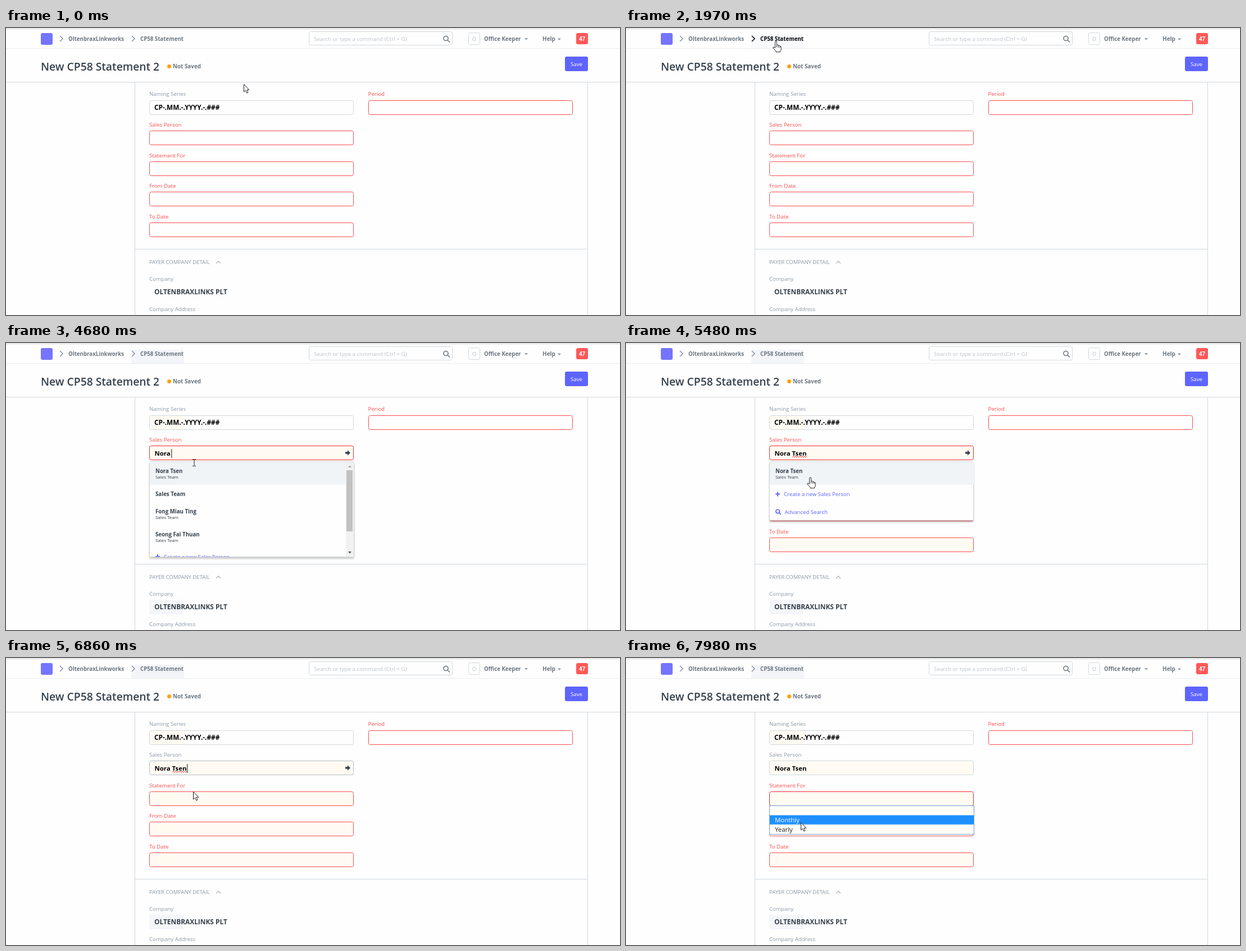
Recreate the animation shown at these times as an HTML page. Size 1093 by 512 pixels, loop 8000 ms.

```html
<!DOCTYPE html>
<html lang="en">
<head>
<meta charset="utf-8">
<title>New statement form</title>
<style>
  html, body { margin: 0; width: 100%; height: 100%; overflow: hidden; background: #fefefe; }
  svg { display: block; width: 1093px; height: 512px; font-family: "Open Sans", "Noto Sans", sans-serif; }

  text { font-size: 9.7px; fill: #8d99a6; white-space: pre; }
  .bold { font-weight: 700; fill: #6c7680; }
  .value { font-size: 11.4px; font-weight: 700; fill: #000; }
  .need { fill: #fc4c4e; }
  .dark { fill: #36414c; }
  .sub { font-size: 7.9px; fill: #36414c; }
  .action { font-size: 9.6px; fill: #5e64ff; }
  .option { font-size: 11.4px; fill: #222; }
  .line { fill: none; stroke: #d1d8dd; }
  .must { fill: none; stroke: #fc4c4e; }
  .icon { fill: none; stroke: #8d99a6; stroke-width: 1.6; }
  .panel { fill: #fefefe; stroke: #d1d8dd; filter: drop-shadow(0 3px 1.8px #0003); }
  .cream { fill: #fffbf3; width: 0; }

  /* One loop is 8 s, so 1% is 80 ms. */
  .t { animation: 8s step-end infinite; }
  .off { opacity: 0; }

  @keyframes crumb1 { 20% { opacity: 1 } 22% { opacity: 0 } }
  @keyframes crumb2 { 22.25% { opacity: 1 } 28.5% { opacity: 0 } }
  @keyframes crumbShade { 22.25% { opacity: .5 } 28.5%, to { opacity: 1 } }
  @keyframes shade { 28.5%, to { opacity: 1 } }

  @keyframes tintName { 28.5%, to { width: 62px } }
  @keyframes tintSales { 28.5% { width: 62px } 40.375%, to { width: 363px } }
  @keyframes tintRest { 28.5% { width: 62px } 46.125%, to { width: 363px } }

  @keyframes salesLabel { 72.75%, to { fill: #8d99a6 } }
  @keyframes salesBorder {
    40.375% { stroke: #f5262b }
    72.75% { stroke: #ee7673 }
    74.75% { stroke: #b5bcc2 }
    88.75%, to { stroke: #d1d8dd }
  }
  @keyframes stateBorder { 88.75%, to { stroke: #f5262b } }

  @keyframes typed {
    46.125% { width: 9.5px } 47.75% { width: 16.5px } 51% { width: 21.7px }
    52% { width: 29px } 68.5%, to { width: 62px }
  }
  @keyframes caretMove {
    46.125% { transform: translateX(9px) } 47.75% { transform: translateX(16px) }
    51% { transform: translateX(22px) } 52% { transform: translateX(29.5px) }
    68.5%, to { transform: translateX(57.5px) }
  }
  @keyframes caretShow { 40.375% { opacity: 1 } 68.5% { opacity: 0 } 75% { opacity: 1 } 88.75% { opacity: 0 } }
  @keyframes squiggle { 68.5% { opacity: 1 } 96.125% { opacity: 0 } }
  @keyframes link { 46.125% { opacity: 1 } 88.75% { opacity: 0 } }

  @keyframes fullList { 46.5% { opacity: 1 } 58.75% { opacity: 0 } }
  @keyframes shortList { 58.75% { opacity: 1 } 69.25% { opacity: 0 } 72.75% { opacity: 1 } 74.75% { opacity: 0 } }
  @keyframes popup { 89.25%, to { opacity: 1 } }
  @keyframes pick { 97.5%, to { transform: translateY(16.5px) } }
  @keyframes pickText { 97.5%, to { fill: #fff } }

  @keyframes path {
    0%, 17.5% { transform: translate(423px, 100px) }
    20.625% { transform: translate(84px, 22px) }
    23.75%, 28.25% { transform: translate(267px, 24px) }
    29% { transform: translate(305px, 484px) }
    36.125%, 58.25% { transform: translate(341px, 203px) }
    58.5% { transform: translate(335px, 213px) }
    63.25%, 68.5% { transform: translate(328px, 240px) }
    70.625%, 74.5% { transform: translate(329px, 251px) }
    80.25%, 85.5% { transform: translate(333px, 230px) }
    85.75% { transform: translate(333px, 238px) }
    86.75%, 96.125% { transform: translate(331px, 248px) }
    99.75%, to { transform: translate(311px, 293px) }
  }
  .cursor { animation: path 8s linear infinite; }
  @keyframes arrow { 19.75% { opacity: 0 } 75.25%, to { opacity: 1 } }
  @keyframes hand { 19.75% { opacity: 1 } 28.5% { opacity: 0 } 61% { opacity: 1 } 75.25% { opacity: 0 } }
  @keyframes beam { 28.5% { opacity: 1 } 61% { opacity: 0 } }
</style>
</head>
<body>
<svg viewBox="0 0 1093 512">
  <defs>
    <rect id="box" x=".5" y=".5" width="363" height="25" rx="3"/>
    <path id="chevron" d="M0 0l5 5-5 5"/>
    <path id="drop" d="M0 0h6l-3 3.4z" fill="#8d99a6"/>
    <g id="lens"><circle r="4"/><path d="M3 3l4 4"/></g>
    <path id="plus" d="M-4 0h8M0-4v8" stroke="#5e64ff" stroke-width="2"/>
    <g id="first">
      <rect x="256" y="212" width="363" height="41" fill="#f0f4f7"/>
      <text class="bold dark" x="266" y="232">Nora Tsen</text>
      <text class="sub" x="266" y="242.3">Sales Team</text>
    </g>
    <clipPath id="typedClip"><rect class="t" style="animation-name:typed" x="264" y="185" width="0" height="24"/></clipPath>
    <clipPath id="listClip"><rect x="256" y="212" width="363" height="169.5"/></clipPath>
  </defs>

  <rect width="1093" height="512" fill="#fefefe"/>

  <!-- Navigation bar -->
  <path d="M0 1.5h1093" stroke="#cfcfcf"/>
  <path d="M0 36.5h1093" stroke="#e9ecef"/>
  <rect x="62" y="9" width="21" height="21" rx="3" fill="#7574ff"/>
  <rect class="t off" style="animation-name:crumbShade" x="223" y="12" width="94" height="24" fill="#f4f5f9"/>
  <use href="#chevron" class="icon" x="96" y="14"/>
  <text class="bold" x="111" y="23">OltenbraxLinkworks</text>
  <use href="#chevron" class="icon" x="224" y="14"/>
  <text class="bold" x="239" y="23">CP58 Statement</text>
  <g class="t off" style="animation-name:crumb1">
    <use href="#chevron" class="icon" x="96" y="14" style="stroke:#222"/>
    <text class="bold" style="fill:#222" x="111" y="23">OltenbraxLinkworks</text>
  </g>
  <g class="t off" style="animation-name:crumb2">
    <use href="#chevron" class="icon" x="224" y="14" style="stroke:#222"/>
    <text class="bold" style="fill:#222" x="239" y="23">CP58 Statement</text>
  </g>
  <rect class="line" x="539.5" y="6.5" width="255" height="24" rx="3"/>
  <text style="font-size:9.85px;fill:#bcc3ca" x="548" y="23">Search or type a command (Ctrl + G)</text>
  <use href="#lens" class="icon" x="783" y="18.5" style="stroke:#6c7680"/>
  <rect class="line" x="823.5" y="8.5" width="20" height="21" rx="3"/>
  <text style="fill:#b8bfc6" x="833.5" y="23" text-anchor="middle">O</text>
  <text class="bold" x="851" y="23">Office Keeper</text>
  <use href="#drop" x="923" y="18"/>
  <text class="bold" x="955" y="23" style="font-size:10px">Help</text>
  <use href="#drop" x="982" y="18.5"/>
  <rect x="1015" y="9" width="21" height="20" rx="3" fill="#ff5858"/>
  <text class="bold" x="1025.5" y="22.8" text-anchor="middle" style="fill:#fff">47</text>

  <!-- Page head -->
  <text class="dark" x="62" y="75.8" style="font-size:19.3px;font-weight:600">New CP58 Statement 2</text>
  <circle cx="290.5" cy="68.5" r="3.5" fill="#ffa00a"/>
  <text class="bold" x="297" y="72" style="font-size:9.85px">Not Saved</text>
  <rect x="995" y="51" width="41" height="26" rx="3" fill="#5e64ff"/>
  <text x="1015.5" y="68" text-anchor="middle" style="fill:#fff">Save</text>
  <path class="line" d="M0 96.5h1093M229.5 96v416M1035.5 96v416M230 394.5h805"/>

  <!-- Form -->
  <text x="255" y="121.3">Naming Series</text>
  <rect class="cream t" style="animation-name:tintName" x="256" y="130" height="24"/>
  <use href="#box" class="line" x="255" y="129"/>
  <text class="value" style="font-size:11.8px" x="264" y="146">CP-.MM.-.YYYY.-.###</text>

  <text class="need" x="644.6" y="121.3">Period</text>
  <use href="#box" class="must" x="645" y="129"/>

  <text class="need t" style="animation-name:salesLabel" x="255" y="176">Sales Person</text>
  <rect class="cream t" style="animation-name:tintSales" x="256" y="184" height="24"/>
  <use href="#box" class="must t" style="animation-name:salesBorder" x="255" y="183"/>
  <text class="value" x="264.5" y="201.3" clip-path="url(#typedClip)">Nora Tsen</text>
  <path class="t off" style="animation-name:squiggle" d="M296 204l2-2 2 2 2-2 2 2 2-2 2 2 2-2 2 2 2-2 2 2 2-2 2 2 2-2" fill="none" stroke="#f33"/>
  <g class="t off" style="animation-name:caretShow">
    <rect class="t" style="animation-name:caretMove" x="264.7" y="189" width="1" height="16"/>
  </g>
  <path class="t off" style="animation-name:link" d="M604 194.3h4v-3l5 4.7-5 4.7v-3h-4z" fill="#36414c"/>

  <text class="need" x="255" y="230.5">Statement For</text>
  <rect class="cream t" style="animation-name:tintRest" x="256" y="239" height="24"/>
  <use href="#box" class="must t" style="animation-name:stateBorder" x="255" y="238"/>

  <text class="need" x="255" y="285.1">From Date</text>
  <rect class="cream t" style="animation-name:tintRest" x="256" y="293" height="24"/>
  <use href="#box" class="must" x="255" y="292"/>

  <text class="need" x="255" y="339.7">To Date</text>
  <rect class="cream t" style="animation-name:tintRest" x="256" y="348" height="24"/>
  <use href="#box" class="must" x="255" y="347"/>

  <text x="255" y="421" style="font-size:9.47px">PAYER COMPANY DETAIL</text>
  <path class="icon" d="M374 420l4-4 4 4" style="stroke:#b8c0c8"/>
  <text x="255" y="451">Company</text>
  <rect class="t off" style="animation-name:shade" x="255" y="458" width="61" height="26" fill="#f5f6fa"/>
  <text class="value dark" style="font-size:11.9px" x="264" y="475">OLTENBRAXLINKS PLT</text>
  <text x="255" y="505.3">Company Address</text>

  <!-- Suggestions, all -->
  <g class="t off" style="animation-name:fullList">
    <rect class="panel" x="255.5" y="211.5" width="364" height="170" rx="2"/>
    <g clip-path="url(#listClip)">
      <use href="#first"/>
      <text class="bold dark" x="266" y="273">Sales Team</text>
      <text class="bold dark" x="266" y="304">Fong Miau Ting</text>
      <text class="sub" x="266" y="314">Sales Team</text>
      <text class="bold dark" x="266" y="345">Seong Fai Thuan</text>
      <text class="sub" x="266" y="355.3">Sales Team</text>
      <use href="#plus" x="270" y="381"/>
      <text class="action" x="281" y="384.5">Create a new Sales Person</text>
      <rect x="605" y="212" width="14" height="170" fill="#f1f1f1"/>
      <rect x="606" y="227" width="11" height="109" fill="#c1c1c1"/>
      <path d="M609 222h6l-3-3.5z" fill="#a3a3a3"/>
      <path d="M609 372h6l-3 3.5z" fill="#505050"/>
    </g>
  </g>

  <!-- Suggestions, filtered -->
  <g class="t off" style="animation-name:shortList">
    <rect class="panel" x="255.5" y="211.5" width="363" height="105" rx="2"/>
    <use href="#first"/>
    <use href="#plus" x="270" y="269.5"/>
    <text class="action" x="281" y="273">Create a new Sales Person</text>
    <use href="#lens" fill="none" stroke="#5e64ff" stroke-width="2" transform="translate(270 300.5) scale(.8)"/>
    <text class="action" x="282.5" y="304.5">Advanced Search</text>
  </g>

  <!-- Period type options -->
  <g class="t off" style="animation-name:popup">
    <rect x="255.5" y="263.5" width="364" height="51" fill="#fffdf8" stroke="#6f9fd4"/>
    <rect class="t" style="animation-name:pick" x="256" y="264" width="363" height="16.5" fill="#1e90ff"/>
    <text class="option t" style="animation-name:pickText" x="265" y="292.8">Monthly</text>
    <text class="option" x="265" y="309.8">Yearly</text>
  </g>

  <!-- Pointer, tip at the origin -->
  <g class="cursor" fill="#fff" stroke="#222" stroke-linejoin="round">
    <path class="t" style="animation-name:arrow" d="M.5.5v13.5l3-2.8 2.2 4.8 2.3-1-2.2-4.7h4z"/>
    <path class="t off" style="animation-name:hand" d="M-1.5 11.5V1.3a1.5 1.5 0 0 1 3 0V6.5q2.3-1 3 .7 2.2-.6 2.6 1 2-.2 2 1.8v4q0 2-1.6 3.2v1.6h-7.6v-1.6L-5 12q-.8-2 1-2zM1.5 6.5v4M4.5 7.2v3.6M7 8.5v2.6"/>
    <path class="t off" style="animation-name:beam" d="M-3-5.5h2.2l.8.8.8-.8H3M-3 6.5h2.2l.8-.8.8.8H3M0-5V6" fill="none"/>
  </g>
</svg>
</body>
</html>
```
